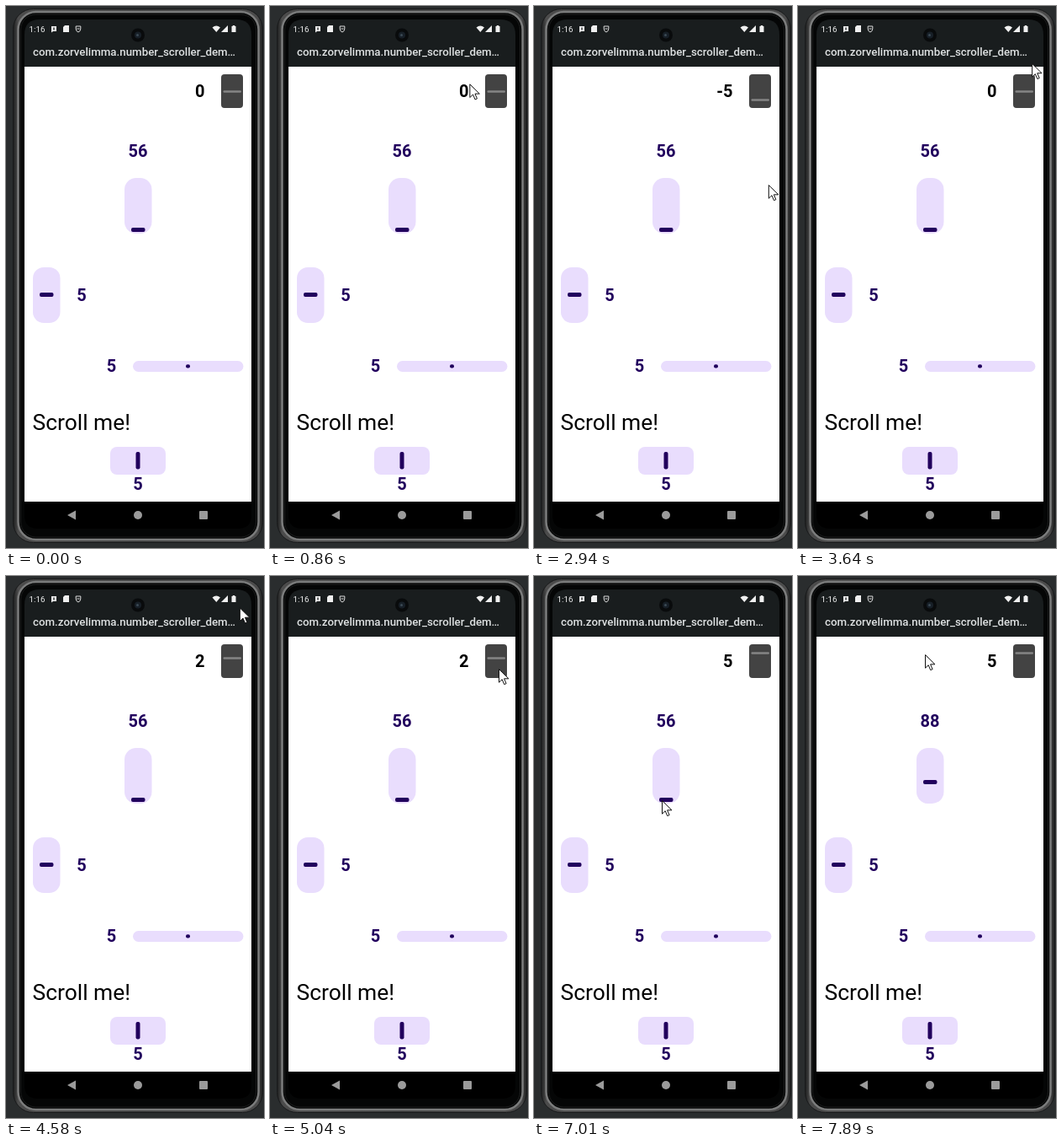
An HTML page that plays this animation: 307 by 643 pixels, repeating every 8 s.

```html
<!DOCTYPE html>
<html lang="en">
<head>
<meta charset="utf-8">
<title>Number scroller</title>
<style>
  html, body { margin: 0; width: 100%; height: 100%; overflow: hidden; background: #2a2d2e; }
  svg { display: block; width: 100%; height: 100%; }
  text { font-family: Roboto, sans-serif; }
  .num { font-size: 20px; font-weight: 600; fill: #21005d; text-anchor: middle; }
  .pill { fill: #e9ddfd; }
  .mark { fill: #21005d; }
</style>
</head>
<body>
<svg viewBox="0 0 307 643">
  <defs>
    <linearGradient id="rim">
      <stop offset="0" stop-color="#1d1e1e"/>
      <stop offset=".02" stop-color="#4c4c4c"/>
      <stop offset=".5" stop-color="#3a3b3b"/>
      <stop offset=".98" stop-color="#4c4c4c"/>
      <stop offset="1" stop-color="#1d1e1e"/>
    </linearGradient>
  </defs>

  <!-- phone body -->
  <rect width="307" height="643" fill="#2a2d2e"/>
  <rect x="8.5" y="3.5" width="297" height="633" rx="24" fill="url(#rim)" stroke="#18191a"/>
  <rect x="14.5" y="7" width="286" height="626" rx="21" fill="#050606" stroke="#7b7c7c" stroke-width="2.5"/>
  <rect x="17.5" y="10" width="280" height="620" rx="18" fill="#050606" stroke="#1c1d1d"/>

  <!-- screen -->
  <path d="M22 72V34Q22 16 40 16H274Q292 16 292 34V72Z" fill="#191d1e"/>
  <rect x="22" y="72" width="270" height="516" fill="#fff"/>
  <path d="M22 588H292V604Q292 620 276 620H38Q22 620 22 604Z" fill="#000"/>

  <!-- status bar -->
  <text x="27.5" y="31" font-size="9.8" fill="#f0f0f0">1:16</text>
  <g fill="#f0f0f0">
    <path d="M54 24h6v6h-4l-2 1.5z"/>
    <path d="M70 23h5v8h-7v-6z"/>
    <path d="M245.5 25.5Q250.3 21.5 255 25.5L250.3 31Z"/>
    <path d="M264 23v8h-8z"/>
    <path d="M268.5 24h1.2v-1h2.6v1h1.2v7h-5z"/>
  </g>
  <path d="M57 25.5v3" stroke="#191d1e" stroke-width="1.3"/>
  <path d="M83.2 24h5.6v3q0 3-2.8 4q-2.8-1-2.8-4zM84.500 27h3" fill="none" stroke="#ddd"/>
  <circle cx="157" cy="34.5" r="8" fill="#090b0c"/>
  <circle cx="157" cy="34.5" r="4" fill="#171f27"/>
  <circle cx="156.5" cy="34.5" r="1.5" fill="#3b4a55"/>
  <text x="32" y="58.5" font-size="13.3" font-weight="500" fill="#dfe2e3">com.zorvelimma.number_scroller_dem…</text>

  <!-- scrollers -->
  <text id="topNum" class="num" x="236.5" y="108" style="fill:#000;text-anchor:end">0</text>
  <rect x="256" y="81" width="26" height="40" rx="4" fill="#434343"/>
  <rect id="topBar" x="258.5" width="21.5" height="2.6" rx="1.2" fill="#858585"/>

  <text id="midNum" class="num" x="157" y="179">56</text>
  <rect class="pill" x="141" y="204" width="32.5" height="66" rx="14"/>
  <rect id="midBar" class="mark" x="149" width="16.5" height="5" rx="2"/>

  <rect class="pill" x="32" y="310" width="32.5" height="66" rx="13"/>
  <rect class="mark" x="40" y="340" width="16.5" height="5" rx="2"/>
  <text class="num" x="90" y="350">5</text>

  <text class="num" x="125.5" y="434">5</text>
  <rect class="pill" x="151" y="421" width="131.5" height="13" rx="6.5"/>
  <rect class="mark" x="214" y="425.3" width="5" height="4.2" rx="2"/>

  <text x="31.5" y="503" font-size="26.4">Scroll me!</text>
  <rect class="pill" x="124" y="523" width="66" height="33" rx="8"/>
  <rect class="mark" x="154.5" y="529" width="5" height="20.5" rx="2"/>
  <text class="num" x="157" y="574">5</text>

  <!-- navigation -->
  <g fill="#9b9b9b">
    <path d="M73 604l10-5.5v11z"/>
    <circle cx="157" cy="604" r="5"/>
    <rect x="230" y="599" width="10" height="10" rx="1"/>
  </g>

  <path id="cursor" d="M.5 .5V16.2L4.2 12.7L6.7 18.6L9.1 17.6L6.6 11.8H12Z"
        fill="#fff" stroke="#111" stroke-linejoin="round"/>
</svg>
<script>
const LOOP = 8000, ENTER = 250;
const $ = id => document.getElementById(id);

// Each move glides the pointer to x, y; a drag also counts a scroller up or down.
const moves = [
  { from: ENTER, to: 950, x: 269, y: 95 },
  { from: 1720, to: 2610, x: 279, y: 246, top: -5 },
  { from: 2790, to: 3550, x: 278, y: 75, top: 5 },
  { from: 3570, to: 4090, x: 279, y: 23, top: 2 },
  { from: 4490, to: 5040, x: 272, y: 110 },
  { from: 5210, to: 5760, x: 272, y: 32, top: 3 },
  { from: 6250, to: 6460, x: 177, y: 245 },
  { from: 6730, to: 7010, x: 152, y: 266 },
  { from: 7350, to: 7890, x: 151, y: 93, mid: 32 }
];

function stateAt(t) {
  const s = { x: 20, y: 74, top: 0, mid: 56 };
  for (const { from, to, x, y, top = 0, mid = 0 } of moves) {
    const k = Math.min(1, Math.max(0, (t - from) / (to - from)));
    s.x += (x - s.x) * k;
    s.y += (y - s.y) * k;
    s.top += Math.trunc(top * k);
    s.mid += Math.trunc(mid * k);
  }
  return s;
}

function render(t) {
  const { x, y, top, mid } = stateAt(t);
  $('cursor').setAttribute('transform', `translate(${x} ${y})`);
  $('cursor').setAttribute('visibility', t < ENTER ? 'hidden' : 'visible');
  $('topNum').textContent = top;
  $('topBar').setAttribute('y', 100.2 - top * 2);
  $('midNum').textContent = mid;
  $('midBar').setAttribute('y', 263 - (mid - 56) * 0.66);
}

const start = performance.now();
function tick() {
  render((performance.now() - start) % LOOP);
  requestAnimationFrame(tick);
}
tick();
</script>
</body>
</html>
```
